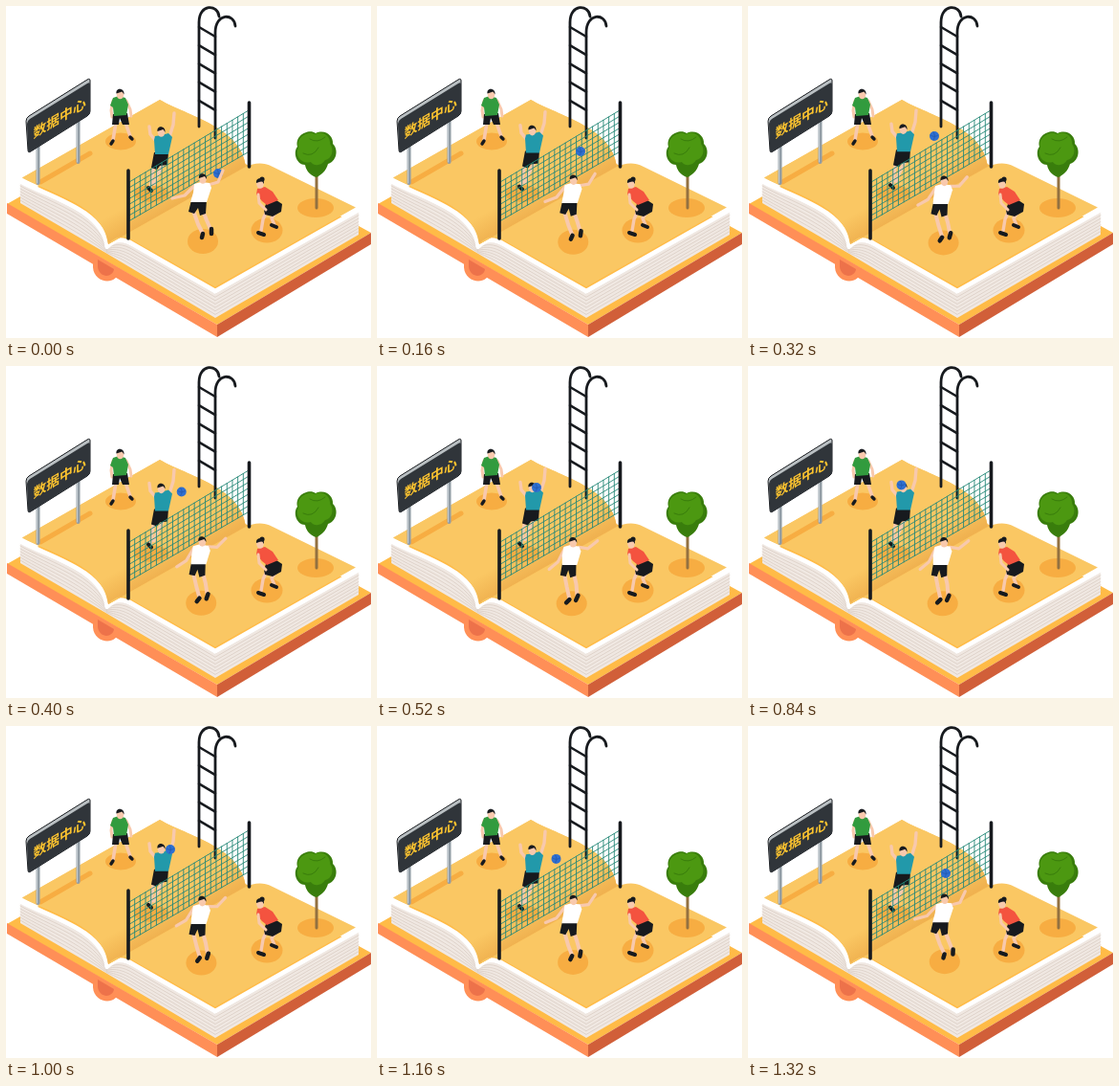
An HTML page with a canvas that plays this animation: 382x347 px, repeating every 1360 ms.

```html
<!DOCTYPE html>
<html lang="zh">
<meta charset="utf-8">
<style>
  html, body { margin: 0; overflow: hidden; background: #fff; }
  canvas { display: block; }
</style>
<canvas width="382" height="347"></canvas>
<script>
const c = document.querySelector('canvas').getContext('2d');
const LOOP = 1360, STEP = 40, HALF = 680;
const SKIN = '#f8c9ad', DARK = '#171a1e', SHADE = '#f7ad42', PAGE = '#fac763';

const fill = (color, d) => { c.fillStyle = color; c.fill(new Path2D(d)); };
const line = (color, width, d) => {
  c.strokeStyle = color;
  c.lineWidth = width;
  c.stroke(new Path2D(d));
};
const oval = (color, x, y, rx, ry = rx) => {
  c.fillStyle = color;
  c.beginPath();
  c.ellipse(x, y, rx, ry, 0, 0, 7);
  c.fill();
};
// Blend two paths that share the same commands.
const mix = (a, b, k) => {
  const end = b.match(/[\d.]+/g);
  let i = 0;
  return a.replace(/[\d.]+/g, n => +n + (end[i++] - n) * k);
};
const head = (x, y) => {
  oval(SKIN, x, y + 1, 3.8, 4.8);
  fill(DARK, `M${x - 4} ${y}C${x - 5} ${y - 7} ${x + 5} ${y - 6} ${x + 4} ${y + 1}L${x + 2} ${y - 2}Z`);
};

function pages(top, bottom) {
  fill('#f0e8e2', top + bottom.fill);
  for (let i = 1; i < 8; i++) line('#ddd1c8', .9, mix(top, bottom.edge, i / 8));
  line('#fff', 5, mix(top, bottom.edge, .04));
}

function book() {
  fill('#ffbb47', 'M1 207L161 116L382 237L221 333Z');
  fill('#ff8f57', 'M1 206L221 333V346L1 217Z');
  fill('#d15f39', 'M221 333L382 237V249L221 346Z');
  fill('#ff8f57', 'M91 262V273C92 291 117 292 118 277Z');
  fill('#ed724a', 'M96 265V273C98 285 112 284 113 275Z');
  pages('M15 182C45 199 102 211 106 251',
    { edge: 'M15 206C45 224 76 241 106 259', fill: 'L106 259L15 206Z' });
  pages('M106 251C113 243 121 241 133 248L219 297',
    { edge: 'M106 259C115 264 124 269 133 275L219 326', fill: 'V326L106 259Z' });
  pages('M219 297L369 212', { edge: 'M219 326L369 239', fill: 'V239L219 326Z' });

  const left = 'M17 179.5C47 196 103 208 107 249L251 168C247 127 190 115 161 98Z';
  fill(PAGE, left);
  const fold = c.createLinearGradient(93, 228, 106, 250);
  fold.addColorStop(0, PAGE);
  fold.addColorStop(1, '#f0b250');
  fill(fold, left);
  fill(PAGE, 'M107 249C114 241 122 239 133 245L219 293.5L366 210.5L279 168C267 162 259 165 251 168Z');
}

function sign() {
  line(SHADE, 5, 'M36 184L88 154');
  line('#929da5', 4, 'M33.5 146V185M75.5 120V163');
  line('#c3cbd0', 1, 'M32.5 146V185M74.5 120V163');
  const board = 'M21 120Q21 117 24 115L85 77Q88 75 88 78V110Q88 113 85 115L26 152Q23 154 23 151Z';
  fill('#b9bfc2', board);
  line(DARK, 1, board);
  fill('#30353a', 'M22 123Q22 120 25 118L85 81Q88 79 88 82V110Q88 113 85 115L26 152Q23 154 23 151Z');
  c.save();
  c.transform(1, -.6, 0, 1, 28.5, 138.5);
  c.font = 'bold 13.8px "Noto Sans CJK SC", "Noto Sans CJK", sans-serif';
  c.fillStyle = '#ffc52f';
  c.fillText('数据中心', 0, 0);
  c.restore();
}

function ladder() {
  line(DARK, 2.8, 'M202 126V17C202-3 222-2 223 11M219 138V28C219 7 239 7 240 21');
  for (let i = 0; i < 5; i++) line(DARK, 2.5, `M202 ${22 + i * 19.2}l17 10`);
}

function net() {
  for (let i = 0; i <= 7; i++) line('#258878', .9, `M129 ${184 + i * 5.8}L254 ${109 + i * 6.2}`);
  for (let i = 0; i <= 22; i++) {
    const x = 129 + i * 125 / 22;
    line('#258878', .9, `M${x} ${184 - i * 75 / 22}V${224.6 - i * 72.2 / 22}`);
  }
  line(DARK, 3.6, 'M128 172V243M254.5 101V168');
}

function greenPlayer() {
  oval(SHADE, 120, 141.5, 16, 9);
  line(SKIN, 3, 'M112 99L110 109L111 116M126 99L130 108L131 115');
  line(SKIN, 3.6, 'M115 122L112 140M125 122L130 136');
  line(DARK, 3.4, 'M112 141L110 144M130 137L132 139');
  fill(DARK, 'M112 113L127 112L129 124L122 124L119 117L118 124L111 124Z');
  fill('#329b3e', 'M112 96L118 94L125 96L128 103L126 114L113 115L112 106L109 104Z');
  head(119.5, 91.5);
}

function bluePlayer(k) {
  oval(SHADE, 152, 196, 18, 9);
  c.save();
  c.translate(0, -6 * k);
  line(SKIN, 3.4, 'M156 140L151 134L150 126M171 137L175 124L176 112');
  line(SKIN, 3.6, 'M155 166L153 177L151 190M164 166L158 178L155 186');
  line(DARK, 4, 'M149 190L152 193');
  fill(DARK, 'M155 153L170 153L169 166L161 167L158 171L152 169Z');
  fill('#2299aa', 'M156 136L163 135L170 133L174 137L170 155L156 155L155 140Z');
  head(162.5, 131);
  c.restore();
}

function whitePlayer(k) {
  const pose = (a, b) => mix(a, b, k);
  oval(SHADE, 206 - 3 * k, 246 + 3 * k, 16, 13);
  line(SKIN, 3.2, pose('M197 188L187 198L174 201', 'M196 192L190 207L182 216'));
  line(SKIN, 3.2, pose('M212 187L222 184L227 172', 'M211 190L220 193L232 186'));
  line(SKIN, 4, pose('M196 214L201 228L206 238', 'M196 218L198 232L200 245'));
  line(SKIN, 4, pose('M206 214L210 224L214 233', 'M206 218L208 229L208 241'));
  line(DARK, 4.5, pose('M206 238L205 242M215 233L215 238', 'M200 246L196 249M209 242L206 247'));
  fill(DARK, pose('M194 203L210 202L209 217L203 219L201 211L197 217L191 215Z',
                  'M194 207L208 206L208 220L202 222L200 214L198 221L192 220Z'));
  fill('#fff', pose('M197 186L204 184L213 185L215 190L210 205L193 205L196 195Z',
                    'M195 190L202 188L211 190L213 195L209 209L194 209L193 199Z'));
  head(206 - k, 180 + 5 * k);
}

function redPlayer() {
  oval(SHADE, 273, 234.5, 16.5, 13);
  line(SKIN, 3.4, 'M273 214L269 223L267 235M282 216L278 222L281 229');
  line(DARK, 4, 'M264 237L270 239M278 229L283 231');
  fill(DARK, 'M272 207L283 203L289 207L288 215L279 220L271 218L270 213Z');
  fill('#f4533f', 'M263 191L271 189L279 194L285 203L273 208L268 204L262 197Z');
  line(SKIN, 3, 'M264 197L265 206L272 213');
  head(266, 185);
  oval(DARK, 268, 181, 2.6);
}

function tree() {
  oval(SHADE, 324, 211, 19, 10);
  line('#937140', 3, 'M325 211V165');
  fill('#397d0c', 'M305 147C302 135 317 128 324 133C334 128 343 136 342 144C349 151 345 163 337 165C335 173 329 177 325 179C320 178 314 173 313 166C304 166 300 153 305 147Z');
  fill('#4c9811', 'M306 148C303 137 317 130 323 134C332 129 340 137 339 144C344 150 341 160 334 161C330 168 321 167 319 163C309 166 302 156 306 148Z');
  line('#397d0c', 1, 'M311 154Q321 159 327 148M318 139Q326 144 334 137');
}

// Time, x and y where the ball passes; the first flight ends at the far player.
const flight = [[0, 222, 175], [160, 213, 152], [320, 195, 136], [520, 167, 127], [HALF, 153, 125]];

function ballAt(t) {
  if (t >= HALF) {
    const u = (t - HALF) / 320;
    return [153 + 11 * u + 8 * u * u, 125 - 6.5 * u + 10.5 * u * u];
  }
  const i = flight.findIndex(p => p[0] > t) - 1;
  const slope = (j, axis) => {
    const a = flight[Math.max(j - 1, 0)], b = flight[Math.min(j + 1, flight.length - 1)];
    return (b[axis] - a[axis]) / (b[0] - a[0]);
  };
  const [a, b] = [flight[i], flight[i + 1]], span = b[0] - a[0], u = (t - a[0]) / span, v = 1 - u;
  return [1, 2].map(n => v * v * (1 + 2 * u) * a[n] + u * u * (3 - 2 * u) * b[n]
    + span * u * v * (v * slope(i, n) - u * slope(i + 1, n)));
}

function ball(t) {
  const [x, y] = ballAt(t);
  oval('#2e6fd1', x, y, 5);
  line('#2458ad', .8, `M${x - 4} ${y - 1}q4 3 8 0M${x - 1} ${y - 4}q3 4 0 8`);
}

function draw(now) {
  const t = Math.floor(now % LOOP / STEP) * STEP;
  const k = 1 - Math.abs(t - HALF) / HALF;
  c.clearRect(0, 0, 382, 347);
  c.lineJoin = c.lineCap = 'round';
  book();
  sign();
  ladder();
  greenPlayer();
  bluePlayer(k);
  net();
  ball(t);
  whitePlayer(k);
  redPlayer();
  tree();
  requestAnimationFrame(() => draw(performance.now() - start));
}
const start = performance.now();
draw(0);
</script>
</html>
```
